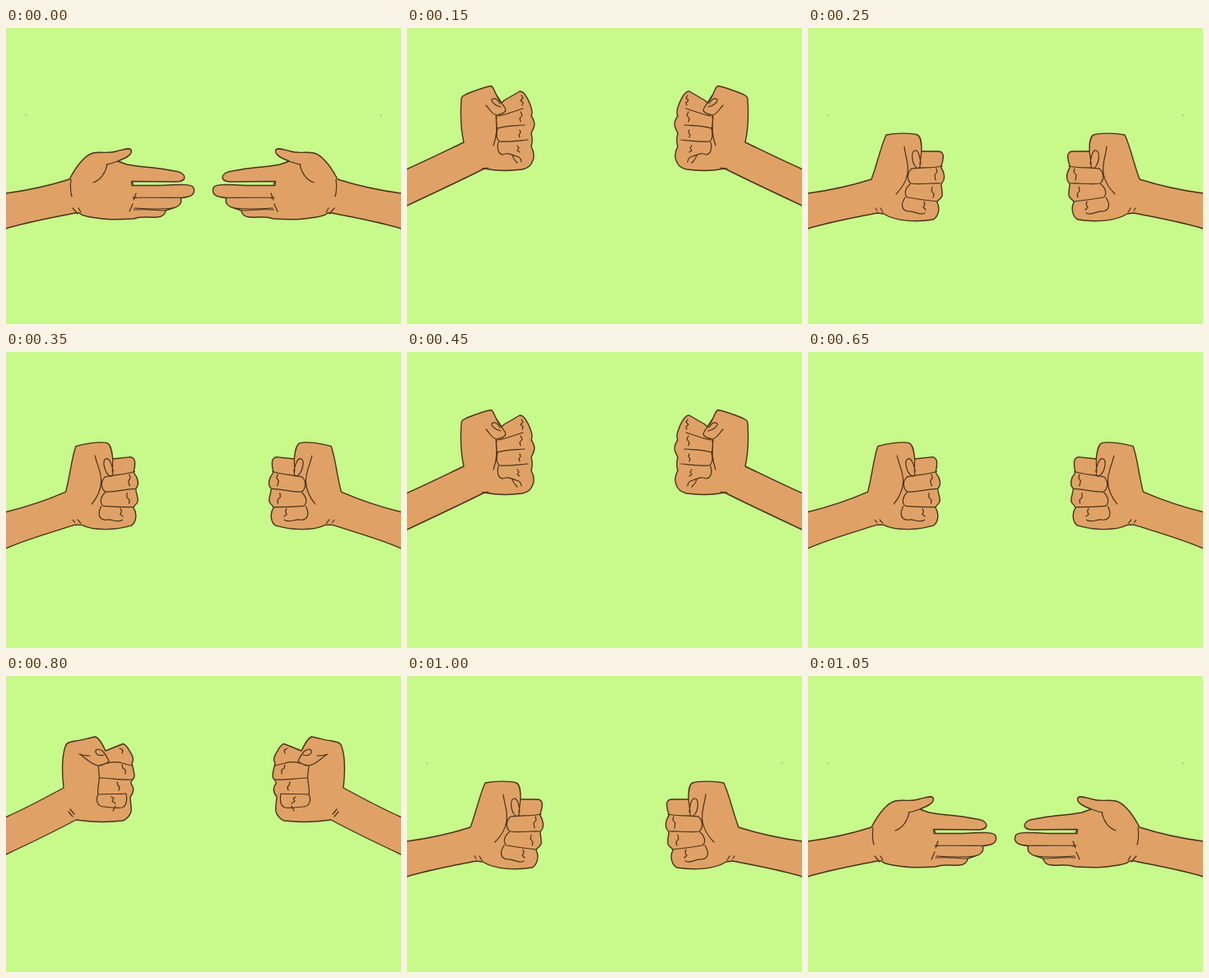
An HTML page for the animation above (1.25 s loop, 480 px wide and 360 px high).

```html
<!DOCTYPE html>
<html lang="en">
<head>
<meta charset="utf-8">
<title>Hand game</title>
<style>
html, body { margin: 0; width: 100%; height: 100%; overflow: hidden; background: #c7f98b; }
svg { display: block; width: 100vw; height: 100vh; }
#hand { fill: none; stroke: #46331a; stroke-width: 1.4; stroke-linecap: round; stroke-linejoin: round; }
#skin { fill: #e0a166; }
#creases { stroke-width: 1.2; }
</style>
</head>
<body>
<svg viewBox="0 0 480 360">
  <rect width="480" height="360" fill="#c7f98b"/>
  <defs>
    <g id="side">
      <g id="hand"><path id="skin"/><path id="creases"/></g>
      <rect id="dot" x="23.5" y="105.5" width="1.5" height="1" fill="#7d9a5c"/>
    </g>
  </defs>
  <use href="#side"/>
  <use href="#side" transform="matrix(-1 0 0 1 480 0)"/>
</svg>
<script>
const get = id => document.getElementById(id);
const skin = get('skin'), creases = get('creases'), hand = get('hand'), dot = get('dot');

const paper = {
  skin: `M-30 206L0 201C30 197 55 191 77 184C84 171 94 155 106 152C116 150 125 153 134 150
    C142 148 149 145 152 148C154 152 149 156 145 158L136 162L147 166C162 169 175 169 188 171
    L205 174C214 175 217 179 217 182C216 187 210 187 206 187L153 186.5L153 191.5L185 191.5
    C205 191 222 189 227 193C230 197 229 203 222 205L212 207C215 213 209 218 203 219L194 222
    C194 226 190 230 184 230C172 231 165 228 155 232C140 233 125 234 110 231C100 230 92 228 89 225
    L84 225C55 231 25 236 0 244L-30 251`,
  creases: `M136 162C131 164 127 165 122 166M123 166C121 176 115 185 106 188M79 184C78 192 78 198 80 205
    M156 206C180 206 205 207 218 206M156 219C170 220 185 221 203 219M155 221C170 220 185 222 194 222
    M158 201L155 209M154 214L150 223M152 187L155 190M154 206L158 207M81 219L87 226M88 219L91 224`,
  dot: true
};

const low = {
  skin: `M-30 206L0 201C30 197 55 191 77 184C84 166 88 145 95 130C105 128 125 127 133 130
    C137 132 138 138 138 150L158 150C164 150 165 155 164 159C164 164 161 167 162 170
    C166 176 167 184 163 188C160 190 164 196 163 204C161 210 157 208 157 212
    C161 220 158 230 152 233C135 236 108 236 92 226L84 225C55 231 25 236 0 244L-30 251`,
  creases: `M138 150L136 165C137 172 133 172 130 168C126 162 125 150 130 149C134 148 136 156 137 165
    M117 144C118 155 123 165 121 177C119 188 112 197 107 202
    M126 171C138 169 150 171 163 168M126 171C119 177 121 186 125 189C137 191 150 188 161 189
    M124 190C117 196 117 203 121 206C132 208 147 210 157 211
    M118 206C112 215 114 222 122 223C130 222 135 229 142 225
    M156 171L157 175L154 179L155 185M151 193L150 198L153 202L152 206M141 211L142 215L140 218L143 221
    M82 219L84 222M88 219L91 224`,
  dot: true
};

// Low fist lifted part of the way
const mid = { ...low, move: 'translate(0 -6) rotate(-6 0 222)', dot: false };

const tilt = {
  skin: `M-30 186L0 171.5C26 160 48 148 70 136C68 118 68 98 72 86C73 81 78 80 84 79
    C93 78 101 75 109 74C114 76 117 83 121 91L142 82.5C147 83 149 90 153 96C155 101 155 103 153 106
    C154 111 156 117 156 122C155 127 151 127 152 131C156 136 155 142 151 147
    C151 153 153 160 152 165C150 171 147 174 142 176C125 178 105 178 85 175C57 190 30 203 0 217L-30 232`,
  creases: `M89 95C94 97 98 97 102 97M91 96C98 101 104 108 112 109C118 108 124 106 125 103
    C123 99 121 95 117 91C112 88 108 89 109 93C111 97 115 97 119 96
    M115 109C122 105 133 103 141 106L153 109
    M114 124C127 124 141 127 153 126M112 144C124 143 135 144 146 143
    M112 109C113 117 114 123 113 128C112 134 111 140 112 144C108 152 112 159 119 159
    C127 160 135 161 141 160C147 158 147 149 146 143
    M138 88L142 90L141 94M141 108L142 112L145 114L145 119M135 129L136 133L138 135L137 139
    M128 147L131 149L129 152L133 155M133 158L130 164M76 165L81 171M78 162L83 168`
};

const high = {
  skin: `M-30 186L0 171.5C24 161 46 150 69 139C65 122 65 102 66 87C66 83 69 82 73 80
    C83 76 94 72 102 70.5C105 71 106 77 109 82L115 91L118 88C125 84 132 80 137 77
    C143 77 147 86 150 94C152 99 153 103 151 107C154 111 156 117 154 121C153 125 151 126 151 129
    C153 134 152 140 151 144C154 150 155 156 153 161C151 167 148 170 140 172
    C125 174 108 174 94 171C64 186 32 201 0 216L-30 230`,
  creases: `M109 82C112 90 119 94 120 100C119 104 113 105 109 106C103 105 101 99 96 94
    M114 96C108 95 102 90 103 87C107 84 110 87 113 92
    M111 107C121 105 131 101 141 98M109 107C108 114 108 119 110 122C121 118 132 119 143 118
    M110 122C108 130 109 135 112 138C124 139 136 137 147 136M108 107C110 120 109 132 105 143
    M111 139C109 147 111 154 117 154C122 151 127 154 133 156C137 157 139 160 139 163
    M128 155C129 160 132 162 134 164
    M139 82L141 85L138 88L141 91L140 94M138 102L140 106L137 110L138 114
    M137 124L138 127L136 130L137 133M134 143L136 146L134 149L137 151M91 171L99 170`
};

const loop = 1250;
const steps = [
  [0, paper], [50, mid], [100, tilt], [150, high], [200, mid], [250, low], [350, mid],
  [450, high], [600, low], [650, mid], [800, tilt], [850, high], [1000, low], [1050, paper]
];

let shown;
function draw(time) {
  const t = time % loop;
  const pose = steps.findLast(([start]) => start <= t)[1];
  if (pose === shown) return;
  shown = pose;
  skin.setAttribute('d', pose.skin);
  creases.setAttribute('d', pose.creases);
  hand.setAttribute('transform', pose.move || 'translate(0 0)');
  dot.setAttribute('opacity', pose.dot ? 1 : 0);
}

const begin = performance.now();
function tick() {
  draw(performance.now() - begin);
  requestAnimationFrame(tick);
}
tick();
</script>
</body>
</html>
```
